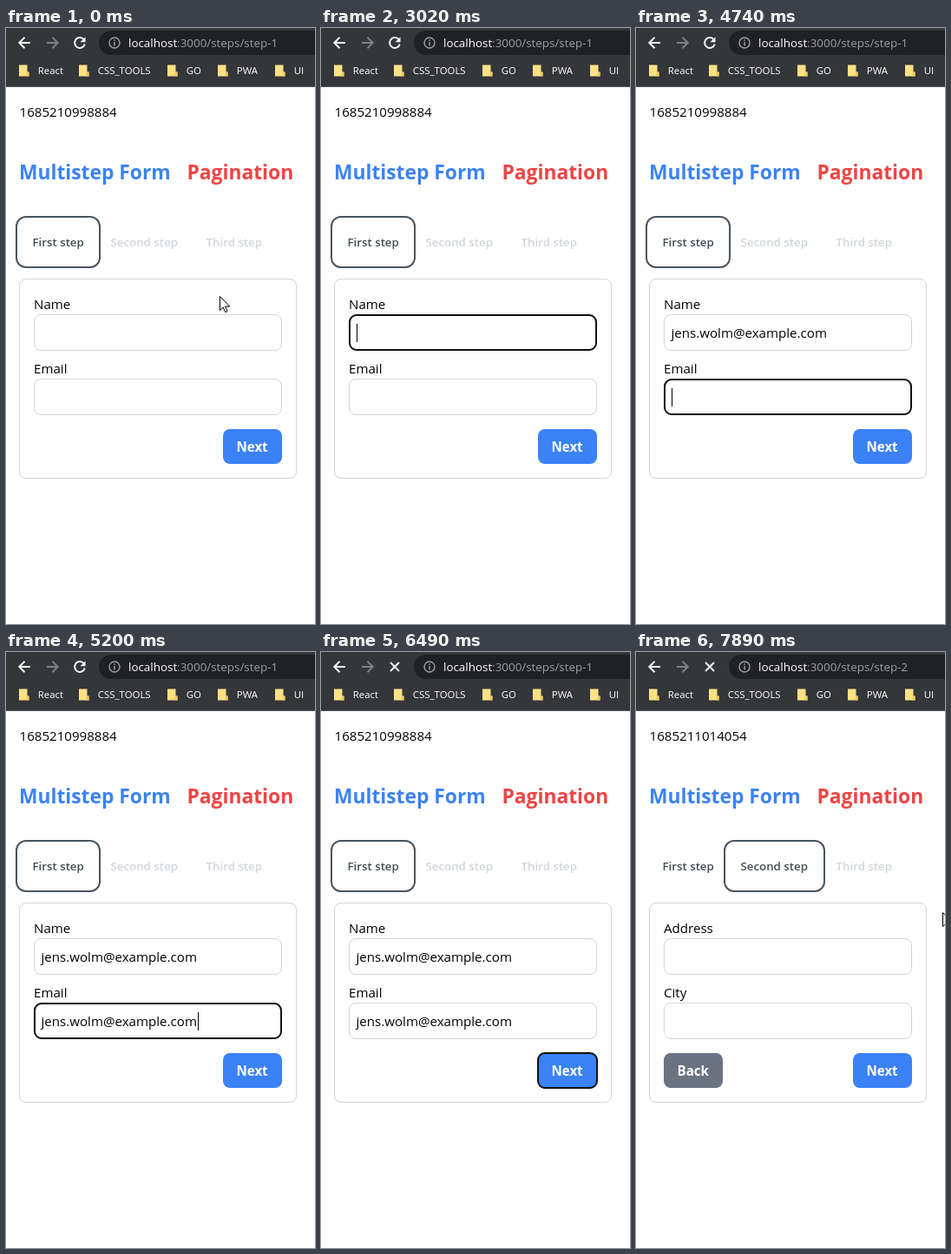
An HTML page that plays this animation: 356 by 685 pixels, repeating every 7.99 s.

```html
<!DOCTYPE html>
<html lang="en">
<head>
<meta charset="utf-8">
<title>Multistep form</title>
<style>
  html, body { margin: 0; width: 100%; height: 100%; overflow: hidden; background: #fff; }
  svg { display: block; width: 100vw; height: 100vh; }
  text { font-family: "Open Sans", "Noto Sans", sans-serif; font-size: 15.1px; white-space: pre; }
  .title { font-size: 22.8px; font-weight: 700; }
  .tab { font-size: 13.3px; font-weight: 600; fill: #434c56; }
  .tab.todo { fill: #d1d5db; }
  .ring { fill: none; stroke: #4b5563; stroke-width: 2; }
  .btn { font-weight: 700; fill: #fff; }
  .box { fill: none; stroke: #d1d5db; }
  .focus { fill: #fff; stroke: #101010; stroke-width: 2; }
  .url { font-size: 13.4px; fill: #9aa0a6; }
  .mark { font-size: 11.4px; fill: #fff; }
  .icon { fill: none; stroke: #f1f3f4; stroke-width: 2; }
</style>
</head>
<body>
<svg viewBox="0 0 356 685" xmlns="http://www.w3.org/2000/svg">
  <!-- browser bar -->
  <rect width="356" height="67" fill="#35363a"/>
  <rect y="67" width="356" height="1" fill="#5a5b5f"/>
  <rect x="107" y="3" width="290" height="28" rx="14" fill="#202124"/>
  <path class="icon" d="M28 17H15.5M21.5 10.8L15.3 17L21.5 23.2"/>
  <path class="icon" d="M47 17H59.5M53.5 10.8L59.7 17L53.5 23.2" style="stroke:#818286"/>
  <g data-on="0-6490">
    <path class="icon" d="M89.2 12.8A5.9 5.9 0 1 0 90.7 18.6"/>
    <path d="M91.5 10.2V16.2H85.5Z" fill="#f1f3f4"/>
  </g>
  <path class="icon" data-on="6490-7990" d="M80 12L90 22M90 12L80 22"/>
  <circle cx="125" cy="17" r="6" fill="none" stroke="#9aa0a6" stroke-width="1.4"/>
  <path d="M125 16V20.4M125 13.2V14.8" stroke="#9aa0a6" stroke-width="1.5"/>
  <text class="url" x="141" y="22"><tspan fill="#fff">localhost</tspan>:3000/steps/step-<tspan id="page">1</tspan></text>
  <g id="marks"></g>

  <!-- headings -->
  <text id="stamp" x="15.5" y="102"></text>
  <text class="title" x="15" y="174" fill="#3b82f6">Multistep Form</text>
  <text class="title" x="208.5" y="174" fill="#ef4444">Pagination</text>

  <!-- tabs -->
  <rect class="ring" data-on="0-6550" x="12" y="217" width="96" height="58" rx="11"/>
  <rect class="ring" data-on="6550-7990" x="102" y="217" width="115" height="58" rx="11"/>
  <text class="tab" x="30.5" y="251">First step</text>
  <text class="tab" id="second" x="120.5" y="251">Second step</text>
  <text class="tab todo" x="230.5" y="251">Third step</text>

  <!-- form -->
  <rect class="box" x="15.5" y="288.5" width="319" height="229" rx="7.5"/>
  <text id="label1" x="32" y="323"></text>
  <text id="label2" x="32" y="397"></text>
  <rect class="box" x="32.5" y="329.5" width="285" height="41" rx="7.5"/>
  <rect class="box" x="32.5" y="403.5" width="285" height="41" rx="7.5"/>
  <rect class="focus" data-on="3020-4740" x="33" y="330" width="284" height="40" rx="8"/>
  <rect class="focus" data-on="4740-5510" x="33" y="404" width="284" height="40" rx="8"/>
  <text data-on="4430-6550" x="40.5" y="356">jens.wolm@example.com</text>
  <text data-on="5200-6550" x="40.5" y="430">jens.wolm@example.com</text>
  <rect data-on="3020-3540 4050-4430" x="41" y="340" width="1" height="21"/>
  <rect data-on="4430-4740" x="221" y="340" width="1" height="21"/>
  <rect data-on="4740-5200" x="41" y="414" width="1" height="21"/>
  <rect data-on="5200-5510" x="221" y="414" width="1" height="21"/>

  <g data-on="6550-7990">
    <rect x="32" y="461" width="68" height="40" rx="8" fill="#6b7280"/>
    <text class="btn" x="47.5" y="487">Back</text>
  </g>
  <rect x="250" y="461" width="68" height="40" rx="8" fill="#3b82f6"/>
  <rect class="focus" data-on="5510-6550" x="250" y="461" width="68" height="40" rx="8" style="fill:none"/>
  <text class="btn" x="265.5" y="487">Next</text>

  <path id="cursor" d="M.5 .5V16.5L4.2 13L6.7 18.6L9 17.6L6.6 12.1H11.8Z" fill="#fff" stroke="#000"/>
</svg>
<script>
  const LOOP = 7990, SWITCH = 6550;
  const byId = id => document.getElementById(id);

  // bookmark folders: icon x, name
  byId("marks").innerHTML = [
    [15, "React"], [84, "CSS_TOOLS"], [186, "GO"], [244, "PWA"], [310, "UI"]
  ].map(([x, name]) => `
    <path d="M${x} 42.5h9.5v8h2v5h-11.5z" fill="#ffe285"/>
    <path d="M${x + 9.5} 50.5h2v5h-3.5z" fill="#eec65a"/>
    <text class="mark" x="${x + 21.8}" y="53">${name}</text>`).join("");

  const timed = [...document.querySelectorAll("[data-on]")].map(el => ({
    el, spans: el.dataset.on.split(" ").map(s => s.split("-").map(Number))
  }));

  // pointer places: start time, x, y; no place means off the stage
  const pointer = [
    [0, 246, 308], [650, 272, 300], [670, 305, 291], [690, 338, 283],
    [720], [7890, 353, 299]
  ];

  const pages = [
    { page: "1", stamp: "1685210998884", label1: "Name", label2: "Email" },
    { page: "2", stamp: "1685211014054", label1: "Address", label2: "City" }
  ];
  let shown = -1;

  function draw(t) {
    for (const { el, spans } of timed)
      el.style.display = spans.some(([a, b]) => t >= a && t < b) ? "" : "none";

    const [, x, y] = pointer.filter(p => p[0] <= t).pop();
    const cursor = byId("cursor");
    cursor.style.display = x === undefined ? "none" : "";
    if (x !== undefined) cursor.setAttribute("transform", `translate(${x} ${y})`);

    const index = t < SWITCH ? 0 : 1;
    if (index !== shown) {
      shown = index;
      for (const [id, value] of Object.entries(pages[index])) byId(id).textContent = value;
      byId("second").classList.toggle("todo", index === 0);
    }
  }

  const start = performance.now();
  function tick() {
    draw((performance.now() - start) % LOOP);
    requestAnimationFrame(tick);
  }
  tick();
</script>
</body>
</html>
```
